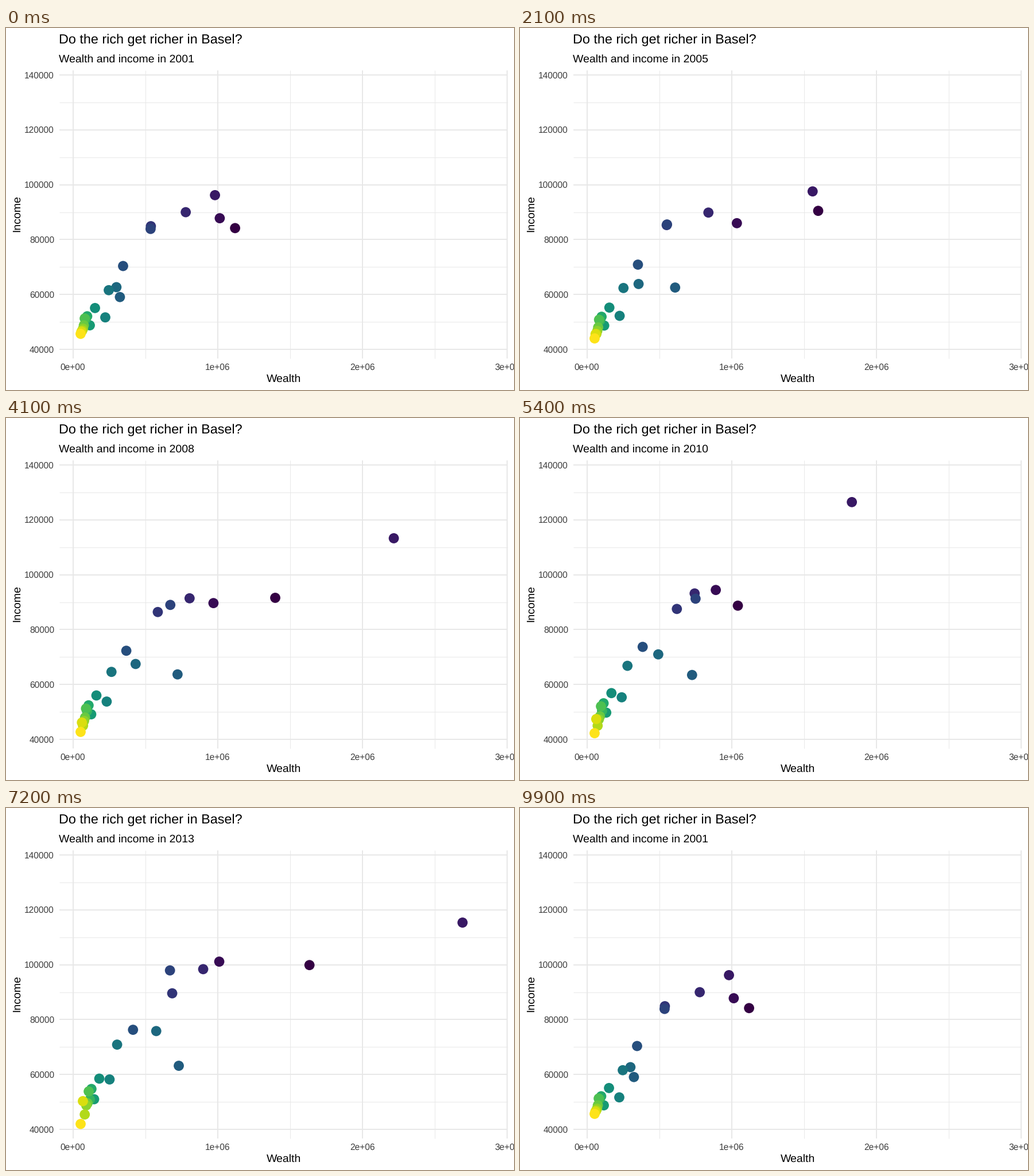
Recreate the animation shown at these times as a matplotlib script. Size 885 by 632 pixels, loop 10 s.

```python
import matplotlib.pyplot as plt
import numpy as np
from matplotlib.animation import FuncAnimation

W, H, DPI = 885, 632, 100
FRAMES, INTERVAL = 100, 100
FIRST, STATES = 2001, 17
BASE = 14  # base font size in points
DISTRICTS = 21
YEARS = FIRST + STATES * np.linspace(0, 1, FRAMES)

plt.rcParams["font.family"] = "Liberation Sans"
plt.rcParams["text.hinting"] = "none"

# Volatile districts: (year, wealth in millions, income in thousands)
STOPS = {
    0: [(2001, 1.121, 84.2), (2003, 1.455, 86.2), (2006, 1.723, 94.2),
        (2010.3, 1.039, 88.7), (2013.4, 1.642, 100), (2015.8, 1.422, 102.3)],
    1: [(2001, 1.015, 87.8), (2006, 1.045, 85.3), (2010.3, 0.89, 94.5),
        (2013.4, 1.013, 101.2)],
    2: [(2001, 0.982, 96.2), (2003, 1.136, 93.5), (2006, 1.928, 101.1),
        (2009, 2.354, 119), (2010.3, 1.82, 126.6), (2014, 2.874, 113),
        (2015.8, 2.541, 122.1)],
    3: [(2001, 0.78, 90), (2006, 0.863, 89.8), (2010.3, 0.744, 93.2),
        (2015.8, 1.025, 102.5)],
    5: [(2001, 0.537, 83.9), (2003, 0.498, 83.9), (2010.3, 0.752, 91.3),
        (2013.4, 0.67, 98), (2015.8, 2.265, 131.2)],
    7: [(2001, 0.325, 59.1), (2006, 0.72, 63.9), (2013.4, 0.732, 63.2),
        (2015.8, 0.547, 63.5)],
    8: [(2001, 0.301, 62.7), (2006, 0.379, 64.3), (2013.4, 0.577, 75.9),
        (2015.8, 0.444, 76.8)],
}
# Steady districts: wealth and income in 2001, then in 2016
STEADY = {
    4: (0.539, 84.9, 0.756, 91.8),
    6: (0.347, 70.4, 0.448, 79.1),
    9: (0.248, 61.6, 0.333, 75.3),
}
# Incomes of the poorer half, from the wealthiest down
LOW_START = [51.7, 55.1, 48.8, 52.1, 51.1, 51.3, 48.8, 47.6, 46.9, 46.5, 45.7]
LOW_END = [61.3, 60.3, 52.4, 56.5, 51.5, 55.9, 50.9, 50.5, 46.1, 53.6, 41.9]


def wandering(stops):
    """Straight runs between stops, back to the start in the last year."""
    end = FIRST + STATES
    path = stops + [(end - 1, *stops[-1][1:]), (end, *stops[0][1:])]
    year, wealth, income = zip(*path)
    return np.interp(YEARS, year, wealth), np.interp(YEARS, year, income)


def steady(w0, i0, w1, i1, dip=0):
    """Accelerating drift with a mid-term dip in income."""
    t = (YEARS - FIRST) / 15
    back = np.clip(FIRST + STATES - YEARS, 0, 1)
    g = t ** 2 * back
    sag = dip * np.sin(np.pi * np.minimum(t, 1))
    return w0 + (w1 - w0) * g, i0 + (i1 - i0) * g - sag


def poorer(k):
    u = k / 10
    w0 = 0.0535 + 0.0555 * (1 - u) + 0.115 * (1 - u) ** 8
    w1 = w0 + 0.0436 * (1 - u ** 4)
    return steady(w0, LOW_START[k], w1, LOW_END[k], dip=2.1 * u)


def district(i):
    if i in STOPS:
        return wandering(STOPS[i])
    return steady(*STEADY[i]) if i in STEADY else poorer(i - 10)


def wealth_x(millions):
    return 116.5 + 252.1 * millions


def income_y(thousands):
    return 561.3 - 4.795 * (thousands - 40)


def deepen(rgb):
    """Display profile: slightly darker mid-tones."""
    return np.asarray(rgb) ** 1.2


wealth, income = np.array([district(i) for i in range(DISTRICTS)]).swapaxes(0, 1)
paths = np.stack([wealth_x(wealth), income_y(income)], axis=-1)
colors = deepen(plt.get_cmap("viridis")(np.linspace(0, 1, DISTRICTS)))

fig = plt.figure(figsize=(W / DPI, H / DPI), dpi=DPI, facecolor="white")
ax = fig.add_axes([0, 0, 1, 1])
ax.set_xlim(0, W)
ax.set_ylim(H, 0)
ax.axis("off")


def grid(xs, ys, px):
    style = dict(color=deepen([0.92] * 3), lw=px * 72 / DPI,
                 solid_capstyle="butt", zorder=1)
    for x in xs:
        ax.plot([x, x], [73.5, 576.5], **style)
    for y in ys:
        ax.plot([92.5, 874], [y, y], **style)


def label(x, y, text, size=BASE, color="black", ha="left", **kw):
    return ax.text(x, y, text, fontsize=size, color=color, ha=ha,
                   va="baseline", **kw)


grid(wealth_x(np.arange(0.5, 3)), income_y(np.arange(50, 140, 20)), 0.94)
grid(wealth_x(np.arange(4)), income_y(np.arange(40, 141, 20)), 1.88)

tick = dict(size=0.8 * BASE, color=deepen([0.3] * 3))
for m in range(4):
    label(wealth_x(m), 596.7, f"{m}e+{6 if m else 0:02d}", ha="center", **tick)
for k in range(40, 141, 20):
    label(84, income_y(k) + 5.6, f"{k}000", ha="right", **tick)

label(92, 27.3, "Do the rich get richer in Basel?", size=1.2 * BASE)
subtitle = label(92.5, 60, "")
label(484, 618, "Wealth", ha="center")
label(24, 324.5, "Income", ha="center", rotation=90, rotation_mode="anchor")

dots = ax.scatter(*paths[:, 0].T, s=12.8 ** 2, c=colors, linewidths=0, zorder=3)


def draw(i):
    year = int(YEARS[i] + 0.5)
    subtitle.set_text(f"Wealth and income in {(year - FIRST) % STATES + FIRST}")
    dots.set_offsets(paths[:, i])
    return dots, subtitle


anim = FuncAnimation(fig, draw, frames=FRAMES, interval=INTERVAL,
                     repeat=True, repeat_delay=0)
plt.show()
```
